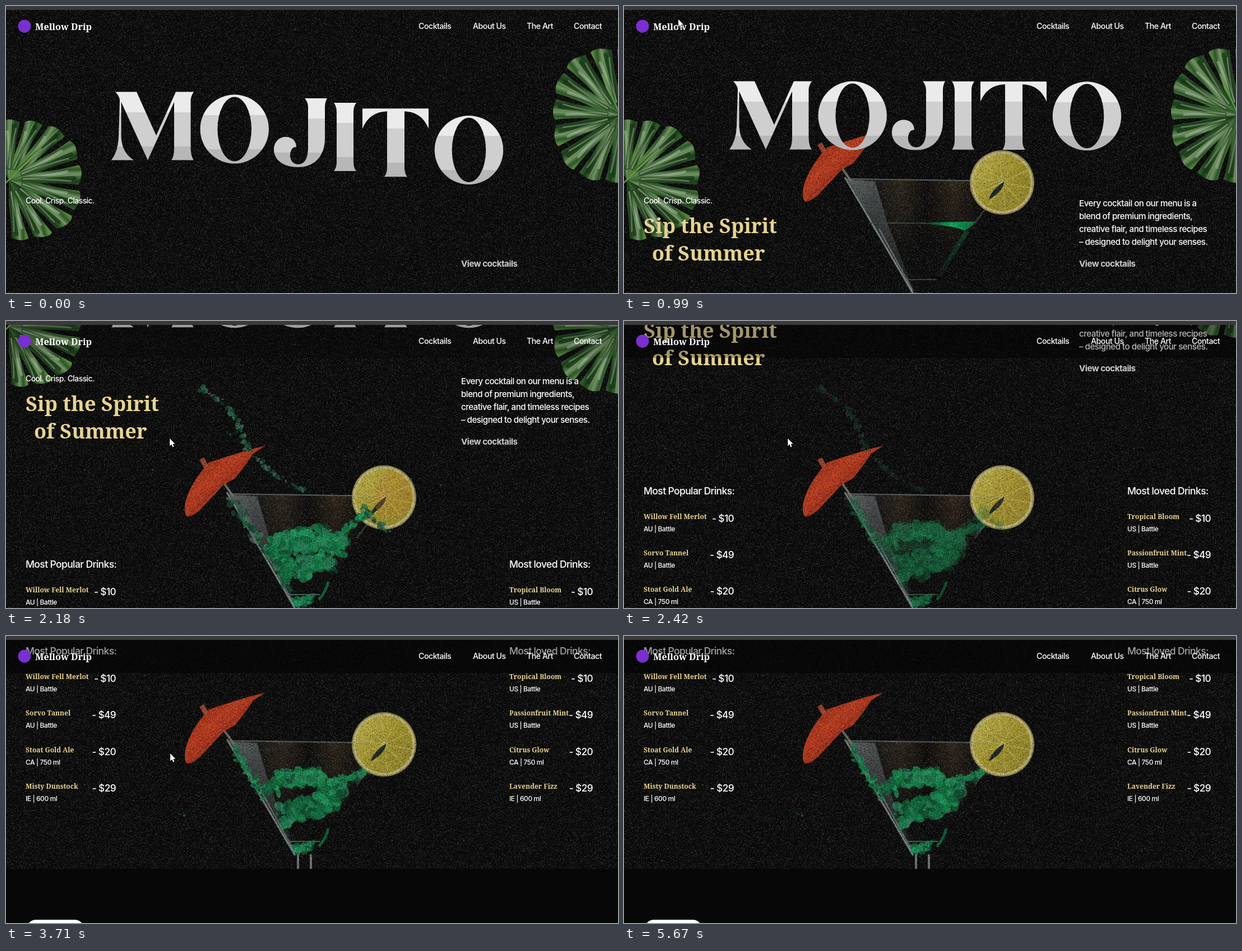
Animation, 1092 px wide and 513 px high, one loop 6090 ms. Source, as an HTML page with a canvas:

```html
<!DOCTYPE html>
<html lang="en">
<head>
<meta charset="utf-8">
<title>Mojito</title>
<style>
  html, body { margin: 0; width: 100%; height: 100%; overflow: hidden; background: #0a0a0a; }
  canvas { display: block; width: 100vw; height: 100vh; }
</style>
</head>
<body>
<canvas id="stage" width="1092" height="513" role="img" aria-label="MOJITO"></canvas>
<script>
const W = 1092, H = 513, LOOP = 6090;
const STEP = 127;      // the screen refreshes in even steps
const NOTCH = 81.6;    // one turn of the scroll wheel
const SANS = 'Inter, "Liberation Sans", sans-serif';
const SERIF = '"Noto Serif", "Liberation Serif", serif';
const BG = '#0a0a0a', GOLD = '#e7d393';
const ctx = document.getElementById('stage').getContext('2d');

const clamp = v => Math.max(0, Math.min(1, v));
const ramp = (v, a, b) => clamp((v - a) / (b - a));
const ease = (v, a, b) => (v = ramp(v, a, b), v * v * (3 - 2 * v));

function random(seed) {
  return () => (seed = (seed * 16807) % 2147483647) / 2147483647;
}

function layer(draw) {
  const c = document.createElement('canvas');
  c.width = W;
  c.height = H + 30;
  draw(c.getContext('2d'));
  return c;
}

function fill(g, d, color) {
  g.fillStyle = color;
  g.fill(new Path2D(d));
}

function stroke(g, d, color, width) {
  g.strokeStyle = color;
  g.lineWidth = width;
  g.stroke(new Path2D(d));
}

function dot(g, x, y, r, color, ry = r, turn = 0) {
  g.fillStyle = color;
  g.beginPath();
  g.ellipse(x, y, r, ry, turn, 0, 7);
  g.fill();
}

function blend(g, x0, y0, x1, y1, ...stops) {
  const b = g.createLinearGradient(x0, y0, x1, y1);
  stops.forEach((c, i) => b.addColorStop(i / (stops.length - 1), c));
  return b;
}

// ---------- still parts ----------
const grain = layer(g => {
  const rnd = random(77), img = g.createImageData(W, H + 30), d = img.data;
  for (let i = 0; i < d.length; i += 4) {
    const dark = rnd() < 0.3, r = rnd();
    d[i] = d[i + 1] = d[i + 2] = dark ? 0 : 255;
    d[i + 3] = dark ? 110 * r : 60 * r ** 5;
  }
  g.putImageData(img, 0, 0);
});

// Lobes fan out between evenly spaced slits; angles are in degrees.
function leaf(cx, cy, rx, ry, from, to, slits, rib) {
  const rim = (deg, k = 1) => {
    const c = Math.cos(deg * Math.PI / 180), s = Math.sin(deg * Math.PI / 180);
    const r = k * (Math.abs(c / rx) ** 2.7 + Math.abs(s / ry) ** 2.7) ** (-1 / 2.7);
    return [cx + c * r, cy + s * r];
  };
  const step = (to - from) / (slits - 1), gap = 2.4;
  return layer(g => {
    g.lineCap = 'round';
    for (let i = -2; i <= slits; i++) {
      const a = from + i * step, b = a + step, mid = a + step / 2;
      const shape = `M${cx} ${cy}L${rim(a, .42)}Q${rim(a + gap * 1.4, .72)} ${rim(a + gap, .97)}` +
        `Q${rim(mid - 3, 1.04)} ${rim(b - gap, .96)}Q${rim(b - gap * 1.4, .72)} ${rim(b, .42)}Z`;
      fill(g, shape, blend(g, ...rim(a, .75), ...rim(b, .75),
        '#56873c', '#2c5427', '#728f66', '#3a6733', '#1c3a1b', '#2f5a2a'));
      g.save();
      g.clip(new Path2D(shape));
      const vein = (f, k, color, width) =>
        stroke(g, `M${rim(mid, .2)}Q${rim(a + step * (f + .5) / 2, .6)} ${rim(a + step * f, k)}`, color, width);
      vein(.3, .8, 'rgba(178,196,172,.45)', 5);
      vein(.62, .9, 'rgba(17,40,17,.6)', 7);
      vein(.75, .85, 'rgba(165,188,155,.4)', 3);
      vein(.5, 1, 'rgba(125,165,92,.8)', 1.2);
      g.restore();
    }
    stroke(g, `M${rim(rib + 180, .15)}L${rim(rib, .62)}`, '#5f9a3c', 2.5);
  });
}
const leftLeaf = leaf(5, 311, 130, 108, -77, 48, 7, -44);
const rightLeaf = leaf(1096, 195, 120, 121, 128, 265, 7, 246);

// Droplets thrown along a quadratic curve.
const GREENS = ['#0d5c34', '#13824a', '#0a4226', '#1a9a5a', '#0f6d3d', '#2a7a58'];
const MIST = ['#123f29', '#1d6b43', '#55695f', '#174a33'];
function spray(g, seed, count, [x0, y0, x1, y1, x2, y2], spread, size, tones = GREENS) {
  const rnd = random(seed), off = () => (rnd() + rnd() - 1) * spread;
  const at = (a, b, c, k) => a * (1 - k) ** 2 + 2 * b * k * (1 - k) + c * k * k;
  g.globalAlpha = .72;
  for (let i = 0; i < count; i++) {
    const k = rnd(), r = size * (.3 + .7 * rnd());
    dot(g, at(x0, x1, x2, k) + off(), at(y0, y1, y2, k) + off(), r,
      tones[Math.floor(rnd() * tones.length)], r * (.4 + .4 * rnd()), rnd() * 3);
  }
  g.globalAlpha = 1;
}

function pool(g) {
  spray(g, 8, 60, [515, 500, 532, 508, 548, 494], 9, 7);
  stroke(g, 'M506 489H560', '#4a6355', 2);
  stroke(g, 'M575 466Q571 484 558 498', '#0d5a34', 5);
}

const splash = layer(g => {
  spray(g, 9, 70, [345, 117, 420, 155, 430, 232], 8, 6, MIST);
  spray(g, 10, 55, [430, 226, 470, 280, 545, 307], 6, 5, MIST);
  spray(g, 11, 9, [300, 250, 500, 150, 790, 330], 60, 3, MIST);
  spray(g, 12, 90, [402, 318, 450, 385, 508, 484], 11, 8, MIST);
  spray(g, 13, 220, [475, 405, 530, 375, 598, 400], 24, 13);
  spray(g, 14, 130, [495, 445, 535, 440, 585, 428], 20, 13);
  spray(g, 15, 50, [590, 385, 625, 355, 648, 342], 9, 8);
  spray(g, 16, 22, [640, 335, 655, 370, 692, 372], 10, 7, MIST);
  pool(g);
});

const swirl = layer(g => {
  spray(g, 21, 60, [406, 320, 428, 365, 460, 408], 9, 7);
  spray(g, 22, 200, [472, 390, 545, 350, 592, 400], 15, 13);
  spray(g, 23, 170, [492, 442, 530, 430, 586, 416], 22, 13);
  spray(g, 24, 60, [580, 388, 620, 378, 648, 356], 9, 8);
  spray(g, 25, 6, [296, 441, 312, 436, 322, 446], 3, 3, MIST);
  dot(g, 543, 374, 30, 'rgba(48,145,95,.4)', 12);
  pool(g);
});

const glass = layer(g => {
  const bowl = 'M393 308L680 313L546 510V543H518V510Z';
  fill(g, bowl, blend(g, 400, 0, 680, 0, '#343938', '#151616', '#2e261c', '#0d0c0b', '#31261a', '#100f0d', BG));
  fill(g, bowl, blend(g, 0, 310, 0, 440, 'rgba(10,10,10,0)', 'rgba(10,10,10,.9)'));
  fill(g, 'M400 311L448 313L470 388L519 513L512 513Z', blend(g, 0, 310, 0, 513, 'rgba(125,132,132,.5)', 'rgba(80,90,90,.2)'));
  stroke(g, 'M394 306L516 514', '#76827f', 3);
  stroke(g, 'M455 398L515 508', 'rgba(175,190,190,.45)', 2.5);
  stroke(g, 'M396 309L680 313', '#59625e', 2);
  stroke(g, 'M677 318L626 388', 'rgba(70,90,80,.5)', 3);
  stroke(g, 'M521 512V543M544 512V543', '#6a7373', 4);
});

const calm = layer(g => {
  stroke(g, 'M437 388H545', '#35443b', 2);
  fill(g, 'M540 387L627 385Q622 396 606 401Q585 392 540 390Z',
    blend(g, 540, 0, 627, 0, '#0b3b22', '#11a257', '#0c6a38'));
  stroke(g, 'M612 402L562 482', blend(g, 612, 402, 562, 482, 'rgba(14,80,45,.7)', 'rgba(14,60,36,.25)'), 8);
  stroke(g, 'M506 489H558', '#33413a', 2);
});

const garnish = layer(g => {
  stroke(g, 'M386 286L406 314', '#6d6a62', 4);
  fill(g, 'M463 223L441 237Q430 255 409 281L388 293L346 338Q332 350 324 350Q317 347 320 325Q328 290 362 253' +
    'Q385 245 438 229Z', blend(g, 340, 260, 385, 310, '#9c2f18', '#b93a1d', '#9f2f19'));
  stroke(g, 'M452 229L328 345', 'rgba(95,25,12,.35)', 1.5);
  stroke(g, 'M349 246L358 262', '#96402d', 9);
  dot(g, 674.5, 315.5, 57.5, '#8f8650');
  dot(g, 674.5, 315.5, 55, '#bcb272');
  dot(g, 674.5, 315.5, 51, blend(g, 630, 280, 715, 350, '#b9ac45', '#a0922c', '#93862c'));
  for (let i = 0; i < 10; i++) {
    const a = i * Math.PI / 5 + .2;
    stroke(g, `M675 315l${50 * Math.cos(a)} ${50 * Math.sin(a)}`, 'rgba(200,192,125,.4)', 2);
  }
  fill(g, 'M678 314Q678 330 651 346Q654 330 678 314Z', '#1a2420');
  stroke(g, 'M618 312L676 314', 'rgba(150,160,130,.5)', 1.5);
});

const ellipse = (x, rx, ry) => `M${x - rx} 195.5a${rx} ${ry} 0 1 0 ${2 * rx} 0a${rx} ${ry} 0 1 0 ${-2 * rx} 0Z`;
const ring = x => ellipse(x, 61.2, 61.5) + ellipse(x, 30.3, 57.5);
const LETTERS = [
  'M195 134H233L268 212L303 134H335Q329.5 142 329.5 150V235Q330 250 335 256H295Q300 250 300 235V152L253 256' +
    'L205.5 152V215Q207 243 228 256H188Q200 240 201 215L203 150Q203 142 195 134Z',
  ring(407.7),
  'M533 134H573Q569 141 569 150V205C569 240 548 257 521 257C495 257 478 244 478 226C478 211 488 203 499 203' +
    'C511 203 518 211 518 221C513 221 510 223 508 229C504 241 511 252 521 252C534 252 539 240 539 220V150Q539 141 533 134Z',
  'M585 134H625Q620 141 620 150V240Q620 250 625 256H585Q590 250 590 240V150Q590 141 585 134Z',
  'M636 134H754V170Q742 140 711 139V240Q711 250 716 256H675Q680 250 680 240V139Q648 140 636 170Z',
  ring(826)
].map(d => new Path2D(d));

// ---------- text ----------
function text(s, x, y, size, { color = '#fff', weight = 500, font = SANS, align = 'left' } = {}) {
  ctx.font = `${weight} ${size}px ${font}`;
  ctx.letterSpacing = (font === SANS ? -0.035 * size : 0) + 'px';
  ctx.textAlign = align;
  ctx.fillStyle = color;
  ctx.fillText(s, x, y);
}
const gold = { color: GOLD, weight: 700, font: SERIF };

const SLOGAN = ['Sip the Spirit', 'of Summer'];
const BLURB = ['Every cocktail on our menu is a', 'blend of premium ingredients,',
  'creative flair, and timeless recipes', '– designed to delight your senses.'];
const POPULAR = ['Willow Fell Merlot', 'Sorvo Tannel', 'Stoat Gold Ale', 'Misty Dunstock'];
const LOVED = ['Tropical Bloom', 'Passionfruit Mint', 'Citrus Glow', 'Lavender Fizz'];
const PRICES = [10, 49, 20, 29];

function menu(title, names, land, x, right, s) {
  const top = 680 - s;
  text(title, x, top + 6, 17.5);
  names.forEach((name, i) => {
    const y = top + 50 + i * 65.2;
    text(name, x, y, 12, gold);
    text([land + ' | Battle', land + ' | Battle', 'CA | 750 ml', 'IE | 600 ml'][i], x, y + 22, 12);
    text('- $' + PRICES[i], right, y + 5, 17.3, { align: 'right' });
  });
}

// ---------- scene ----------
function title(t, s) {
  const bands = ctx.createLinearGradient(0, 134, 0, 257);
  [['#ebebeb', 0, .295], ['#cfcfcf', .295, .79], ['#b7b7b7', .79, 1]].forEach(([c, from, to]) => {
    bands.addColorStop(from, c);
    bands.addColorStop(to, c);
  });
  ctx.fillStyle = bands;
  LETTERS.forEach((p, i) => {
    ctx.save();
    ctx.translate(0, 19.5 * 2 ** (i / 3 - t / 180) - s);
    ctx.fill(p, 'evenodd');
    ctx.restore();
  });
}

// Each line rises and fades in a little after the one before.
function reveal(t, i, lead, show) {
  const age = t - 20 - i * 60, k = 2 ** (-age / 120);
  if (age <= 0) return;
  ctx.globalAlpha = 1 - k;
  show(k * lead);
  ctx.globalAlpha = 1;
}

function drink(s) {
  const lift = -Math.max(0, s - 531), burst = ease(s, 0, 200) - ease(s, 270, 450);
  [[glass, 1], [calm, 1 - ease(s, 0, 150)], [swirl, ease(s, 260, 460)], [garnish, 1], [splash, burst]]
    .forEach(([img, a]) => { ctx.globalAlpha = a; ctx.drawImage(img, 0, lift); });
  ctx.globalAlpha = burst;
  dot(ctx, 690, 312, 36, 'rgba(205,130,50,.28)', 42);
  ctx.globalAlpha = 1;
}

const scroll = t => NOTCH * (3 * ramp(t, 1776, 2159) + 4 * ramp(t, 2159, 2790) + ramp(t, 2990, 3170));

// Time, x and y where the hand changes direction or speed.
const HAND = [[990, 91, 1], [1250, 150, 228], [1770, 292, 210], [3680, 293, 210], [3810, 298, 211], [3937, 465, 308],
  [4445, 572, 358], [4572, 799, 445], [5080, 934, 464], [5461, 984, 505]];

function pointer(t) {
  if (t < HAND[0][0] || t > 5600) return;
  const i = HAND.findLastIndex(p => p[0] <= t), a = HAND[i], b = HAND[i + 1] || a;
  const k = ramp(t, a[0], b === a ? t + 1 : b[0]);
  const x = a[1] + (b[1] - a[1]) * k, y = a[2] + (b[2] - a[2]) * k;
  const arrow = `M${x} ${y}v13.5l3.1-2.9 2.1 4.9 2.2-.9-2.1-4.8h4.2Z`;
  stroke(ctx, arrow, '#000', 1.5);
  fill(ctx, arrow, '#fff');
}

function header(shade) {
  ctx.fillStyle = `rgba(0,0,0,${shade * .36})`;
  ctx.fillRect(0, 7, W, 59);
  dot(ctx, 33, 36, 11.5, '#7a2fd0');
  text('Mellow Drip', 52, 43, 16.2, { weight: 700, font: SERIF });
  [['Cocktails', 736], ['About Us', 833], ['The Art', 929], ['Contact', 1013]]
    .forEach(([str, x]) => text(str, x, 41, 14.2));
  ctx.fillStyle = '#3a393b';
  ctx.fillRect(0, 0, W, 7);
}

function draw(t) {
  const s = scroll(t), shade = ease(t, 1800, 2650);
  ctx.fillStyle = '#070707';
  ctx.fillRect(0, 0, W, H);

  ctx.save();
  ctx.beginPath();
  ctx.rect(0, 0, W, 538 - Math.max(0, s - 531));
  ctx.clip();
  ctx.fillStyle = BG;
  ctx.fillRect(0, 0, W, H);
  if (t > 0) drink(s);
  ctx.drawImage(grain, 0, 0);
  ctx.restore();

  ctx.globalAlpha = shade * .6;
  ctx.fillStyle = BG;
  ctx.fillRect(0, 7, W, 59);
  ctx.globalAlpha = 1;

  ctx.drawImage(leftLeaf, 0, -s * 1.23);
  ctx.drawImage(rightLeaf, 0, -s * .76);
  title(t, s);
  text('Cool. Crisp. Classic.', 35, 353 - s, 13.8);
  text('View cocktails', 812, 466 - s, 15.2, { color: '#cacaca', weight: 700 });
  SLOGAN.forEach((str, i) => reveal(t, i, 49, dy => text(str, 35 + i * 15, 406 + i * 49 - s + dy, 36, gold)));
  BLURB.forEach((str, i) => reveal(t, i + 2, 23, dy => text(str, 812, 358 + i * 23 - s + dy, 15.2)));

  menu('Most Popular Drinks:', POPULAR, 'AU', 35, 196, s);
  menu('Most loved Drinks:', LOVED, 'US', 898, 1047, s);
  ctx.fillStyle = '#fff';
  ctx.beginPath();
  ctx.roundRect(37, 1160 - s, 102, 40, 16);
  ctx.fill();

  header(shade);
  pointer(t);
}

let last = -1;
function loop(now) {
  const step = Math.floor(now % LOOP / STEP + .4);
  if (step !== last) draw((last = step) * STEP);
  requestAnimationFrame(loop);
}
loop(0);
</script>
</body>
</html>
```
